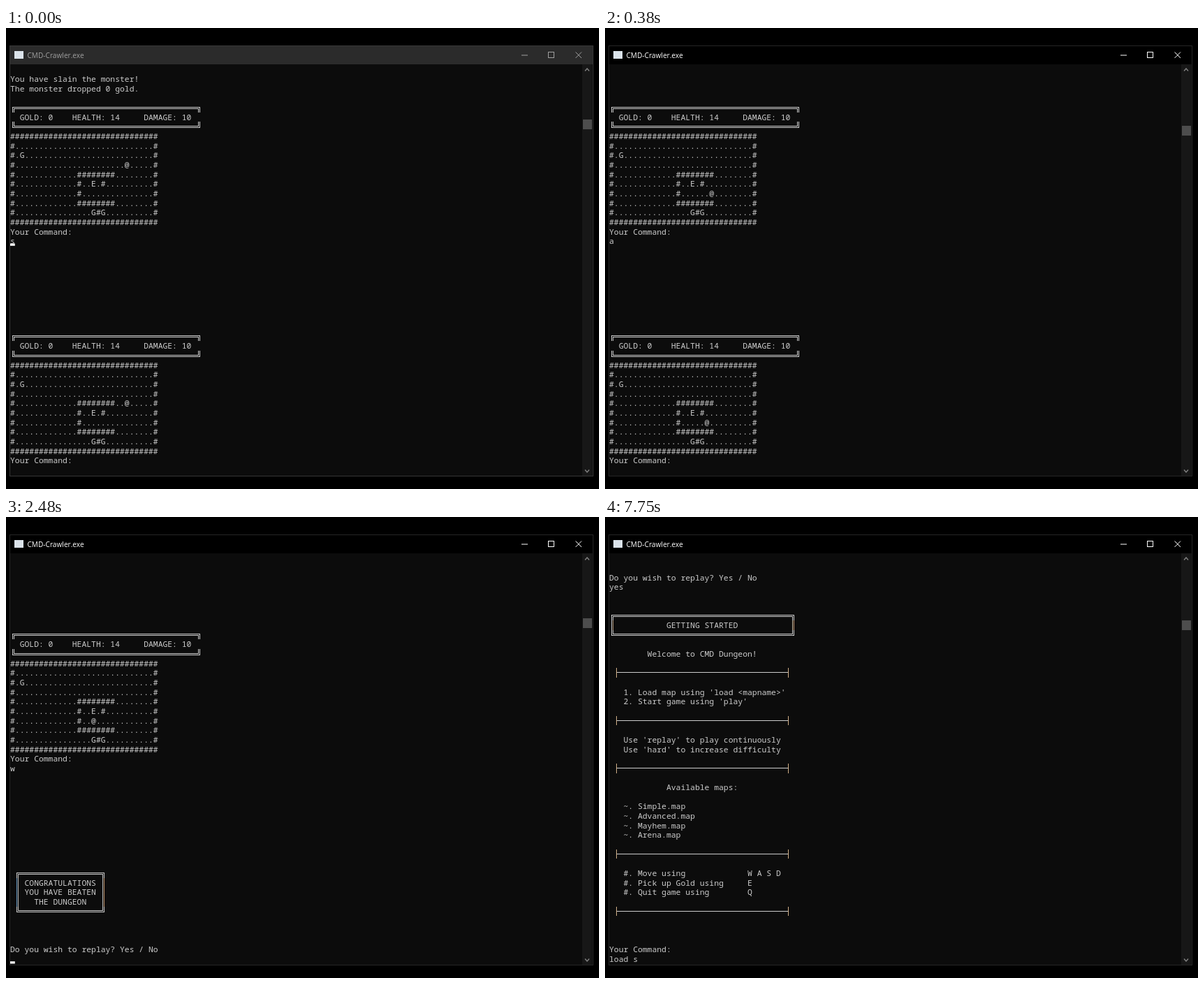
These frames come from a looping animation (849 px wide and 660 px high, 8000 ms). An HTML page with a canvas:

```html
<!DOCTYPE html>
<html lang="en">
<head>
<meta charset="utf-8">
<title>CMD-Crawler.exe</title>
<style>
html, body { margin: 0; width: 100%; height: 100%; overflow: hidden; background: #000; }
canvas { display: block; }
</style>
</head>
<body>
<canvas id="stage" width="849" height="660"></canvas>
<script>
const ctx = document.getElementById('stage').getContext('2d');
const LOOP = 8000;
const CELL_W = 6.827, CELL_H = 13.653, LEFT = 6, TOP = 52.5;
const ROWS = 42;
const INK = '#cccccc';

// ---- Transcript of the console session ----
const pad = (n, s = '') => ' '.repeat(n) + s;
const blank = n => Array(n).fill('');
const row = s => s.padEnd(30, '.') + '#';
const wall = '#'.repeat(31);
const ledge = row('#' + '.'.repeat(13) + '########');
const dungeon = [
  wall, row('#'), row('#.G'), row('#'), ledge,
  row('#.............#..E.#'), row('#.............#'), ledge,
  row('#................G#G'), wall
];

function turn(x, y, key) {
  const map = dungeon.map((s, i) => i === y ? s.slice(0, x) + '@' + s.slice(x + 1) : s);
  const bar = '═'.repeat(38);
  return [
    '╔' + bar + '╗',
    '  GOLD: 0    HEALTH: 14     DAMAGE: 10',
    '╚' + bar + '╝',
    ...map, 'Your Command:', key, ...blank(9)
  ];
}

function walk(x, y, keys) {
  const out = [];
  for (const key of keys) {
    out.push(...turn(x, y, key));
    if (key === 's') y++;
    if (key === 'a') x--;
  }
  return out;
}

const rule = ' ├' + '─'.repeat(35) + '┤';
const item = s => pad(3, s);
const lines = [
  '', 'You have slain the monster!', 'The monster dropped 0 gold.', '',
  ...walk(24, 3, 'ssaaasaaaaw'),
  '',
  ' ╔' + '═'.repeat(17) + '╗',
  ' ║ CONGRATULATIONS ║',
  ' ║ YOU HAVE BEATEN ║',
  ' ║   THE DUNGEON   ║',
  ' ╚' + '═'.repeat(17) + '╝',
  ...blank(3),
  'Do you wish to replay? Yes / No', 'yes', '', '',
  '╔' + '═'.repeat(37) + '╗',
  '║' + pad(11, 'GETTING STARTED').padEnd(37) + '║',
  '╚' + '═'.repeat(37) + '╝',
  '', pad(8, 'Welcome to CMD Dungeon!'), '', rule, '',
  item("1. Load map using 'load <mapname>'"),
  item("2. Start game using 'play'"), '', rule, '',
  item("Use 'replay' to play continuously"),
  item("Use 'hard' to increase difficulty"), '', rule, '',
  pad(12, 'Available maps:'), '',
  ...['Simple', 'Advanced', 'Mayhem', 'Arena'].map(s => item('~. ' + s + '.map')),
  '', rule, '',
  item('#. Move using').padEnd(29) + 'W A S D',
  item('#. Pick up Gold using').padEnd(29) + 'E',
  item('#. Quit game using').padEnd(29) + 'Q',
  '', rule, ...blank(3), 'Your Command:'
];

// ---- Timeline: [ms, first visible line] and [ms, bottom row, cursor on] ----
const scrolls = [
  [0, 0], [30, 48], [80, 72], [140, 96], [200, 114], [250, 120], [380, 144],
  [660, 168], [910, 192], [1180, 212], [1220, 216], [1550, 234], [1610, 236], [4010, 275]
];
const prompts = [
  [0, '', 0], [200, '#.............#..E.', 0], [250, '', 0],
  [2480, '', 1], [3050, '', 0], [3180, 'y', 1], [3310, 'ye', 1], [3450, 'yes', 1], [3550, 'yes', 0],
  [4010, '', 1], [4620, '', 0], [5140, '', 1], [5650, '', 0], [6210, '', 1],
  [6250, 'l', 1], [6490, 'lo', 1], [6630, 'loa', 1], [6720, 'loa', 0],
  [6960, 'load', 1], [7190, 'load', 0], [7240, 'load ', 1], [7570, 'load s', 1], [7750, 'load s', 0]
];
const at = (list, t) => list.findLast(e => e[0] <= t);

// ---- Drawing ----
function rect(x, y, w, h, color) {
  ctx.fillStyle = color;
  ctx.fillRect(x, y, w, h);
}

function path(points, color, width = 1) {
  ctx.strokeStyle = color;
  ctx.lineWidth = width;
  ctx.beginPath();
  points.forEach(([x, y], i) => i ? ctx.lineTo(x, y) : ctx.moveTo(x, y));
  ctx.stroke();
}

// Subpixel colour fringes of the upright double lines, by column
const fringe = {
  0: ['#c8c8c8', '#b89c7c'], 1: ['#6c9fc8', '#b8b8b8'],
  19: ['#c0c0c0', '#c0946c'], 38: ['#c8b8a0', '#c09470']
};

function boxGlyph(ch, col, r) {
  const top = TOP + r * CELL_H, cx = LEFT + (col + 0.5) * CELL_W;
  const x0 = Math.round(LEFT + col * CELL_W), x1 = Math.round(LEFT + (col + 1) * CELL_W);
  const y0 = Math.round(top), y1 = Math.round(top + CELL_H);
  const xa = Math.round(cx - 0.85), xs = [xa, xa + 2];
  const ya = Math.round(top + 5.5), ys = [ya, ya + 2];
  const h = (a, b, y) => rect(a, y, b - a, 1, INK);
  const v = (x, a, b, color = INK) => rect(x, a, 1, b - a, color);

  if (ch === '═') ys.forEach(y => h(x0, x1, y));
  else if (ch === '║') xs.forEach((x, i) => v(x, y0, y1, fringe[col][i]));
  else if ('─├┤'.includes(ch)) {
    const x = Math.round(cx - 0.2);
    h(ch === '├' ? x : x0, ch === '┤' ? x : x1, Math.round(top + 5.9));
    if (ch !== '─') v(x, y0, y1, '#cfae88');
  } else {
    const right = '╔╚'.includes(ch), down = '╔╗'.includes(ch);
    for (const i of [0, 1]) {
      const x = xs[i], y = ys[right === down ? i : 1 - i];
      right ? h(x, x1, y) : h(x0, x + 1, y);
      down ? v(x, y, y1) : v(x, y0, y + 1);
    }
  }
}

function print(text, r) {
  const base = Math.round(TOP + r * CELL_H + 11);
  ctx.font = "500 11.38px 'Noto Sans Mono', monospace";
  [...text].forEach((ch, col) => {
    if (ch === ' ') return;
    if (ch >= '─' && ch <= '╬') return boxGlyph(ch, col, r);
    ctx.fillStyle = INK;
    ctx.fillText(ch, LEFT + col * CELL_W, base);
  });
}

function cursor(col, r) {
  rect(LEFT + col * CELL_W, TOP + r * CELL_H + 10.2, CELL_W, 3.4, '#f2f2f2');
}

function drawWindow(active) {
  const ink = active ? '#ffffff' : '#a0a0a0';
  rect(0, 0, 849, 660, '#000');
  rect(5, 25, 836, 617, active ? '#262626' : '#363636');
  rect(6, 26, 834, 26, active ? '#000' : '#2b2b2b');
  rect(6, 52, 834, 589, '#0c0c0c');
  rect(12, 33, 13, 11, '#dbe3ea');

  ctx.font = "10.1px 'Open Sans', sans-serif";
  ctx.fillStyle = ink;
  ctx.fillText('CMD-Crawler.exe', 30.5, 43);

  path([[738, 39], [747, 39]], ink);
  ctx.strokeRect(776.5, 34.5, 8, 8);
  path([[815.5, 34.5], [824, 43]], ink);
  path([[824, 34.5], [815.5, 43]], ink);
}

function drawScrollbar(top) {
  rect(825, 52, 14, 589, '#171717');
  rect(826, Math.round(131 + top * 0.0614), 13, 14, '#4d4d4d');
  path([[829, 61.5], [832, 58], [835, 61.5]], '#858585', 1.3);
  path([[829, 632.5], [832, 636], [835, 632.5]], '#858585', 1.3);
}

function draw(t) {
  const top = at(scrolls, t)[1];
  const [, typed, blink] = at(prompts, t);
  drawWindow(t >= 30);
  drawScrollbar(top);
  lines.slice(top, top + ROWS).forEach(print);
  print(typed, ROWS);
  if (blink) cursor(typed.length, ROWS);
  if (t < 30) cursor(0, 18);
}

const start = performance.now();
function tick() {
  draw((performance.now() - start) % LOOP);
  requestAnimationFrame(tick);
}
tick();
</script>
</body>
</html>
```
